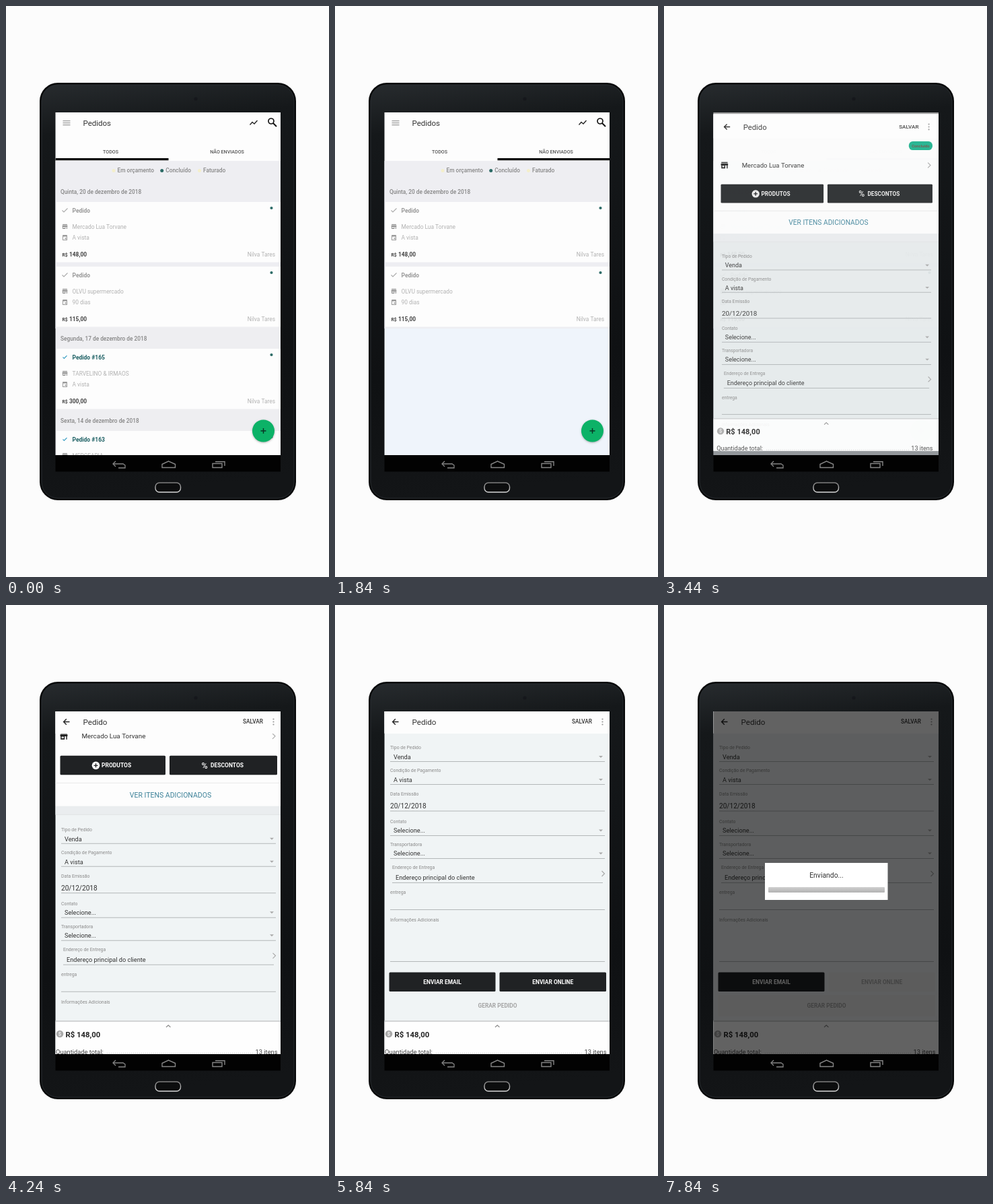
Write an HTML page with a canvas that moves like this. It is 480 px wide and 848 px high and loops after 8000 ms.

```html
<!DOCTYPE html>
<html lang="pt-BR">
<head>
<meta charset="utf-8">
<title>Pedidos</title>
<style>
html, body { margin: 0; height: 100%; overflow: hidden; background: #fcfcfc; }
canvas { display: block; width: 480px; height: 848px; }
</style>
</head>
<body>
<canvas id="stage" width="480" height="848"></canvas>
<script>
const c = document.getElementById('stage').getContext('2d');
const LOOP = 8000;
const SELLER = 'Nilva Tares';
const CLIENT = 'Mercado Lua Torvane';

// ---------- drawing helpers ----------
function rect(x, y, w, h, fill, radius = 0) {
  c.fillStyle = fill;
  c.beginPath();
  c.roundRect(x, y, w, h, radius);
  c.fill();
}

function disc(x, y, r, fill) {
  c.fillStyle = fill;
  c.beginPath();
  c.arc(x, y, r, 0, 7);
  c.fill();
}

function line(points, color, width = 1, close = false) {
  c.strokeStyle = color;
  c.lineWidth = width;
  c.beginPath();
  points.forEach(([x, y]) => c.lineTo(x, y));
  if (close) c.closePath();
  c.stroke();
}

// y is the middle of the capital letters
function text(str, x, y, size, color, weight = 400, align = 'left') {
  c.font = `${weight} ${size}px Roboto, sans-serif`;
  c.textAlign = align;
  c.fillStyle = color;
  c.fillText(str, x, y + size * 0.355);
}

function group(draw) {
  c.save();
  draw();
  c.restore();
}

function clipTo(x, y, w, h) {
  c.beginPath();
  c.rect(x, y, w, h);
  c.clip();
}

function scaleAround(x, y, k) {
  c.translate(x, y);
  c.scale(k, k);
  c.translate(-x, -y);
}

// ---------- icons ----------
function storeIcon(x, y, k, color) {
  group(() => {
    c.translate(x, y);
    c.scale(k, k);
    rect(-4, -4, 8, 1.2, color);
    rect(-4.5, -2.2, 9, 2.4, color);
    rect(-4, 0, 5, 4, color);
    rect(-2.8, 0.6, 2.6, 2, '#fff');
    rect(2.8, 0, 1.2, 4, color);
  });
}

function calendarIcon(x, y, color) {
  c.strokeStyle = color;
  c.lineWidth = 1;
  c.strokeRect(x - 3, y - 3, 6, 6.5);
  rect(x - 3, y - 4, 6, 2.4, color);
  rect(x, y + 0.3, 2, 2, color);
}

function tick(x, y, color, k = 1) {
  line([[x - 4 * k, y], [x - 1.5 * k, y + 2.5 * k], [x + 4 * k, y - 3 * k]], color, 1.1);
}

function caret(x, y) {
  c.fillStyle = '#aaa';
  c.beginPath();
  c.moveTo(x - 3, y - 1.5);
  c.lineTo(x + 3, y - 1.5);
  c.lineTo(x, y + 1.5);
  c.fill();
}

function chevron(x, y) {
  line([[x - 2, y - 4], [x + 2, y], [x - 2, y + 4]], '#aaa', 1.2);
}

// ---------- tablet ----------
function tablet() {
  rect(0, 0, 480, 848, '#fcfcfc');
  rect(50, 114, 381, 620, '#08090a', 27);
  const body = c.createLinearGradient(60, 116, 130, 732);
  body.addColorStop(0, '#272b2e');
  body.addColorStop(0.12, '#15181a');
  body.addColorStop(0.7, '#0f1113');
  body.addColorStop(1, '#131517');
  rect(53, 117, 375, 614, body, 24);
  c.strokeStyle = '#2d3235';
  c.lineWidth = 0.8;
  c.beginPath();
  c.roundRect(53, 117, 375, 614, 24);
  c.stroke();
  disc(282, 138, 2.5, '#15171b');

  const rim = c.createLinearGradient(0, 707, 0, 723);
  rim.addColorStop(0, '#777');
  rim.addColorStop(1, '#ddd');
  c.fillStyle = '#0c0d0e';
  c.strokeStyle = rim;
  c.lineWidth = 1.4;
  c.beginPath();
  c.roundRect(222, 708, 37.5, 14, 6);
  c.fill();
  c.stroke();

  rect(73.5, 667, 334.5, 24.5, '#020202');
  const gray = '#858585';
  line([[163, 676], [159, 680], [163, 684]], gray, 1.3);
  line([[159, 680], [174, 680], [177, 682], [177, 686], [167, 686]], gray, 1.3);
  line([[232, 685.5], [232, 680.5], [241.5, 676], [251.5, 680.5], [251.5, 685.5]], gray, 1.4, true);
  line([[307, 679.5], [321, 679.5], [321, 685.5], [307, 685.5]], gray, 1.4, true);
  line([[311, 676.8], [325, 676.8], [325, 683]], gray, 1.4);
}

// ---------- order list ----------
function card(y, title, client, terms, price, sent) {
  rect(75, y, 333, 89.5, '#fdfdfd');
  tick(87.5, y + 12.5, sent ? '#3d9fc4' : '#aaa', sent ? 0.75 : 1);
  text(title, 98.5, y + 12.5, 8.5, sent ? '#1d6064' : '#999', 700);
  disc(394.5, y + 9, 2.1, '#2c6b66');
  storeIcon(87.5, y + 36.5, 0.85, '#8a8a8a');
  text(client, 98.5, y + 37, 8.4, '#b2b2b2');
  calendarIcon(87.5, y + 53, '#9a9a9a');
  text(terms, 98.5, y + 53.5, 8.4, '#b2b2b2');
  text('R$', 83.5, y + 78.5, 6.6, '#444', 700);
  text(price, 94, y + 78, 8.4, '#444', 700);
  text(SELLER, 400, y + 78, 8.4, '#b2b2b2', 400, 'right');
}

function listPage(all) {
  rect(73, 230, 335, 437, all ? '#eeeef1' : '#eff4fb');
  rect(73, 230, 335, 249, '#eeeef2');
  const filters = [
    ['Em orçamento', 160, '#f4efcb'],
    ['Concluído', 231.7, '#2c6b66'],
    ['Faturado', 287.5, '#f4efcb'],
  ];
  for (const [name, x, color] of filters) {
    disc(x, 244.5, 2.5, color);
    text(name, x + 5.5, 244.5, 8.4, '#888', 500);
  }
  text('Quinta, 20 de dezembro de 2018', 81, 276.5, 8.3, '#858585', 500);
  card(291, 'Pedido', CLIENT, 'A vista', '148,00', false);
  card(387, 'Pedido', 'OLVU supermercado', '90 dias', '115,00', false);
  if (!all) return;
  text('Segunda, 17 de dezembro de 2018', 81, 494, 8.3, '#858585', 500);
  card(509, 'Pedido #165', 'TARVELINO & IRMAOS', 'A vista', '300,00', true);
  text('Sexta, 14 de dezembro de 2018', 81, 616, 8.3, '#858585', 500);
  card(631, 'Pedido #163', 'MERCEARIA', 'A vista', '210,00', true);
}

function listScreen(page) {
  group(() => {
    clipTo(73, 230, 335, 437);
    c.translate(-335 * page, 0);
    listPage(true);
    c.translate(335, 0);
    listPage(false);
  });
  rect(73, 158, 335, 72, '#fdfdfd');
  for (const y of [170, 173, 176]) rect(84.5, y, 11, 1.2, '#999');
  text('Pedidos', 114.5, 173.5, 11.5, '#333');
  line([[362.5, 176.5], [366, 172.5], [369, 175], [373.5, 170]], '#222', 1.3);
  c.strokeStyle = '#111';
  c.lineWidth = 1.7;
  c.beginPath();
  c.arc(394, 171, 4, 0, 7);
  c.stroke();
  line([[397, 174], [402, 179]], '#111', 2);
  text('TODOS', 155.5, 216, 7.1, '#555', 500, 'center');
  text('NÃO ENVIADOS', 328.5, 216, 7.1, '#555', 500, 'center');
  rect(73.5 + 168 * page, 226, 168, 3.2, '#050505');

  group(() => {
    c.shadowColor = 'rgba(0,0,0,.3)';
    c.shadowBlur = 3;
    c.shadowOffsetY = 1;
    disc(382.5, 631, 16.5, '#0cb267');
  });
  line([[378.5, 631], [386.5, 631]], '#0a3324', 1.4);
  line([[382.5, 627], [382.5, 635]], '#0a3324', 1.4);
}

// ---------- order form ----------
function button(x, y, w, label, enabled = true) {
  rect(x, y, w, 28.5, enabled ? '#202224' : '#efefee', 1.5);
  text(label, x + w / 2, y + 14.5, 8.4, enabled ? '#fff' : '#aaa', 700, 'center');
}

// label, label y, value, value y, value x, value size, underline y, mark
const FIELDS = [
  ['Tipo de Pedido', 212, 'Venda', 225.5, 87, 9.2, 232.5, caret],
  ['Condição de Pagamento', 246, 'A vista', 259.5, 87, 9.2, 266.5, caret],
  ['Data Emissão', 280.5, '20/12/2018', 298.5, 82, 10.1, 306],
  ['Contato', 321.5, 'Selecione...', 335, 87, 9.2, 342.5, caret],
  ['Transportadora', 355.5, 'Selecione...', 369, 87, 9.2, 376.5, caret],
  ['Endereço de Entrega', 390, 'Endereço principal do cliente', 405, 90, 9.2, 412.5, chevron],
  ['entrega', 426.5, '', 0, 0, 9, 452.5],
  ['Informações Adicionais', 467.5, '', 0, 0, 9, 529.5],
];

function formContent(sending) {
  rect(60, -10, 360, 187, '#fdfdfd');
  rect(367, 36.5, 36, 13.5, '#14ae89', 6);
  text('Concluído', 385, 43.5, 6, '#8a4a45', 500, 'center');
  storeIcon(86, 73, 1.2, '#1b1b1b');
  text(CLIENT, 112.5, 73, 9.9, '#333');
  chevron(398, 73);
  rect(80.5, 102, 156.5, 28.5, '#202224', 1.5);
  rect(243, 102, 160, 28.5, '#202224', 1.5);
  disc(133.5, 116.5, 5.8, '#fff');
  line([[130.5, 116.5], [136.5, 116.5]], '#202224', 1.4);
  line([[133.5, 113.5], [133.5, 119.5]], '#202224', 1.4);
  text('PRODUTOS', 142, 116.5, 8.5, '#fff', 700);
  text('%', 290.5, 116.5, 12.5, '#fff', 500);
  text('DESCONTOS', 304, 116.5, 8.5, '#fff', 700);
  rect(60, 142, 360, 1, '#e8e8e8');
  text('VER ITENS ADICIONADOS', 244.5, 160, 10.5, '#3d8299', 400, 'center');
  rect(60, 177, 360, 12, '#eaedef');
  rect(60, 189, 360, 1, '#dfe2e3');

  for (const [label, labelY, value, y, x, size, rule, mark] of FIELDS) {
    const inset = mark === chevron ? 3 : 0;
    text(label, 82 + inset, labelY, 6.9, '#8a8a8a');
    if (value) text(value, x, y, size, '#333');
    rect(82 + inset, rule - 0.5, 319 - inset * 2, 1, '#b3b7b8');
    if (mark === caret) caret(395, y);
    if (mark === chevron) chevron(398.5, y - 6);
  }
  button(80.5, 545.5, 158, 'ENVIAR EMAIL');
  button(244.5, 545.5, 158.5, 'ENVIAR ONLINE', !sending);
  if (sending) rect(80.5, 579, 322.5, 32, '#efefee');
  text('GERAR PEDIDO', 241.5, 595, 8.4, '#a5a5a5', 700, 'center');
}

function formScreen(scroll, sending) {
  rect(60, 154, 360, 513, '#f0f4f5');
  group(() => {
    clipTo(60, 154, 360, 513);
    c.translate(0, 159 - scroll);
    formContent(sending);
  });

  rect(60, 154, 360, 37, '#fdfdfd');
  line([[94.5, 173.5], [86, 173.5]], '#222', 1.4);
  line([[89.8, 169.3], [85.6, 173.5], [89.8, 177.7]], '#222', 1.4);
  text('Pedido', 114.5, 173.5, 11.6, '#333');
  text('SALVAR', 352, 173.5, 8.3, '#333', 500);
  for (const y of [169.5, 173.5, 177.5]) disc(397.5, y, 1.1, '#999');

  rect(60, 617, 360, 2, '#d2d4d5');
  rect(60, 619, 360, 48, '#fefefe');
  line([[238, 627], [241.2, 624], [244.4, 627]], '#888', 1.1);
  disc(80, 637, 5.3, '#a9a9a9');
  text('$', 80, 637, 7.5, '#fff', 500, 'center');
  text('R$ 148,00', 88.5, 637.5, 11.3, '#222', 700);
  text('Quantidade total:', 74, 663.5, 9.3, '#444');
  text('13 itens', 403.5, 663.5, 9.3, '#444', 400, 'right');
  c.setLineDash([1, 2]);
  line([[150, 665.5], [368, 665.5]], '#c4c4c4', 0.8);
  c.setLineDash([]);
}

function dialog(fade, message) {
  rect(73, 158, 335, 509, `rgba(0,0,0,${0.61 * fade})`);
  const shown = Math.min(1, fade * 4);
  group(() => {
    c.globalAlpha = shown;
    scaleAround(241.5, 410.5, 0.9 + 0.1 * shown);
    rect(150, 383, 182.5, 55, '#fff');
    text(message, 241.5, 401, 10.4, '#333', 400, 'center');
    if (shown < 1) return;
    const track = c.createLinearGradient(0, 419, 0, 427);
    track.addColorStop(0, '#cfcfcf');
    track.addColorStop(1, '#b2b2b2');
    rect(155, 419, 173, 8, track, 1);
  });
}

// ---------- timeline ----------
// The picture advances in alternating holds of 160 and 240 ms.
function hold(t) {
  const phase = t % 400;
  return t - phase + (phase >= 240 ? 240 : phase >= 80 ? 80 : -160);
}

function ramp(t, from, to) {
  const u = Math.min(1, Math.max(0, (t - from) / (to - from)));
  return u * u * (3 - 2 * u);
}

function render(time) {
  const t = hold(time);
  tablet();
  group(() => {
    clipTo(73.5, 158, 334.5, 509);
    if (t < 3680) listScreen(ramp(t, 80, 880));
    if (t < 3440) return;

    const sending = t >= 6880;
    if (t < 3680) {
      rect(73, 158, 335, 509, 'rgba(0,0,0,.38)');
      c.globalAlpha = 0.9;
      scaleAround(241, 413, 0.975);
    }
    formScreen(159 * ramp(t, 4057, 4640), sending);
    if (sending) dialog(ramp(t, 6800, 7280), t < 7440 ? 'Iniciando...' : 'Enviando...');
  });
}

const start = performance.now();
function frame() {
  render((performance.now() - start) % LOOP);
  requestAnimationFrame(frame);
}
frame();
</script>
</body>
</html>
```
